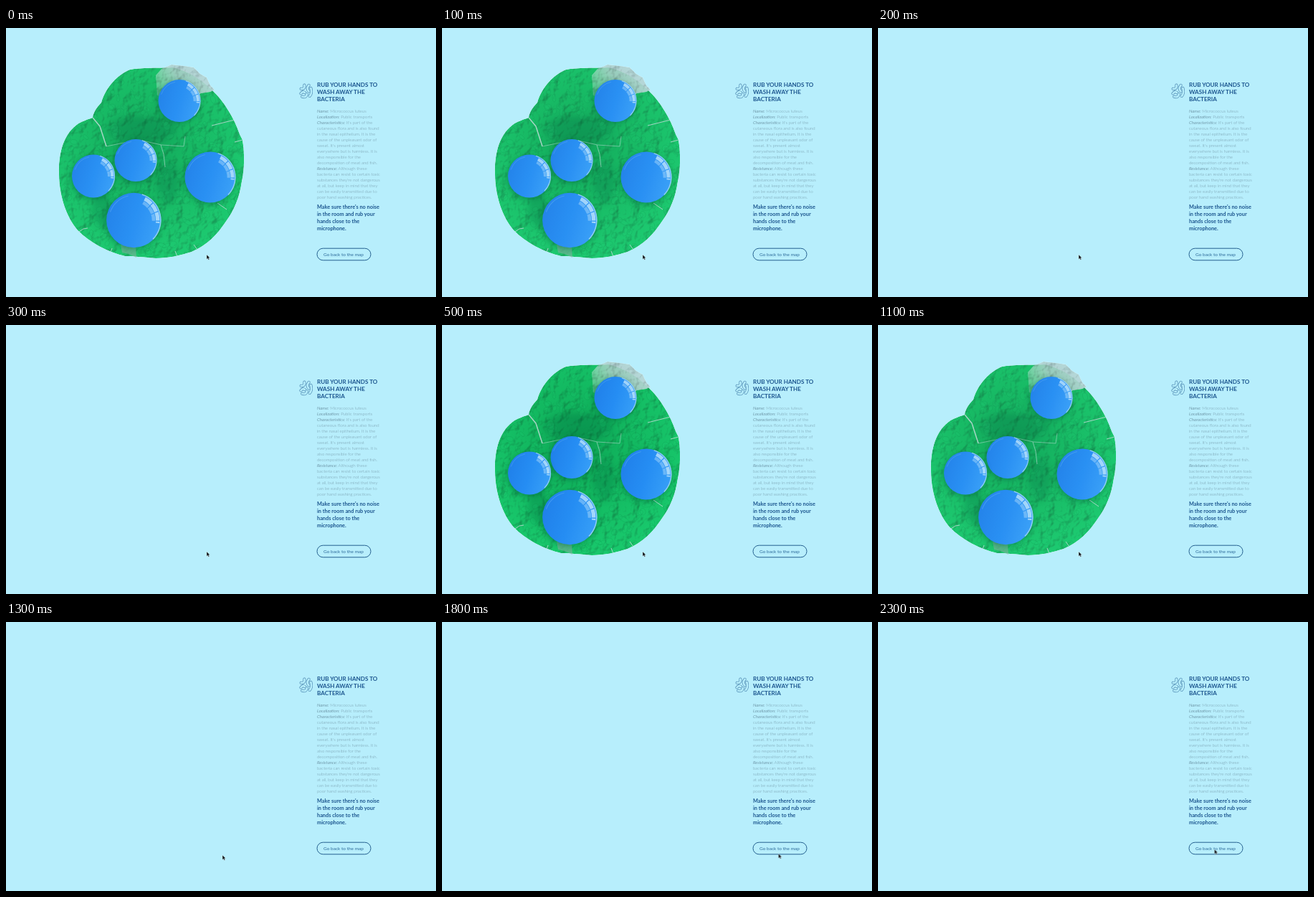
Animation of 600x375 px, one loop 2.4 s. Source, as an HTML page:

```html
<!DOCTYPE html>
<html lang="en">
<head>
<meta charset="utf-8">
<title>Rub your hands</title>
<style>
  html, body { margin: 0; width: 100%; height: 100%; overflow: hidden; background: #b7eefc; }
  svg { display: block; width: 600px; height: 375px; font-family: Lato, "Open Sans", sans-serif; }
  .head { font-size: 8.1px; font-weight: 700; fill: #1c568f; }
  .body { font-size: 6.1px; font-weight: 300; fill: #7397a7; }
  .body .label { font-style: italic; font-weight: 400; fill: #7199aa; }
  .note { font-size: 7.35px; font-weight: 700; fill: #1c568f; }
  .button text { font-size: 6.5px; fill: #2c6a99; }
  .button rect { fill: none; stroke: #24608f; }

  #colony { animation: blink 2400ms step-end infinite; }
  @keyframes blink {
    0% { opacity: .97; }
    8.33% { opacity: 0; }
    16.66% { opacity: 1; }
    33.33% { opacity: .98; }
    45.83% { opacity: .97; }
    50%, 100% { opacity: 0; }
  }

  #cursor { animation: travel 2400ms step-end infinite; }
  @keyframes travel {
    0% { transform: translate(280px, 316px); }
    54.16% { transform: translate(302px, 325px); }
    58.33% { transform: translate(352px, 335px); }
    62.5% { transform: translate(412px, 336px); }
    66.66% { transform: translate(450px, 332px); }
    70.83% { transform: translate(466px, 326px); }
    75% { transform: translate(469.5px, 323px); }
    79.16% { transform: translate(469.5px, 321px); }
    83.33% { transform: translate(469.5px, 318px); }
    87.5%, 100% { transform: translate(469.5px, 317px); }
  }
</style>
</head>
<body>
<svg viewBox="0 0 600 375">
  <defs>
    <radialGradient id="green" gradientUnits="userSpaceOnUse" cx="192" cy="165" r="155">
      <stop offset="0" stop-color="#0da555"/>
      <stop offset=".45" stop-color="#12b860"/>
      <stop offset="1" stop-color="#18c86c"/>
    </radialGradient>
    <linearGradient id="blue" x1="0" y1=".35" x2="1" y2=".65">
      <stop offset="0" stop-color="#2080ea"/>
      <stop offset=".5" stop-color="#258df3"/>
      <stop offset="1" stop-color="#379ff7"/>
    </linearGradient>
    <linearGradient id="grey" x1="0" y1=".6" x2="1" y2=".3">
      <stop offset="0" stop-color="#9fc9c0" stop-opacity=".3"/>
      <stop offset=".4" stop-color="#a0c4c0" stop-opacity=".85"/>
      <stop offset="1" stop-color="#b4d6d6" stop-opacity=".95"/>
    </linearGradient>
    <filter id="rough" color-interpolation-filters="sRGB">
      <feTurbulence type="fractalNoise" baseFrequency=".07" numOctaves="3" seed="7"/>
      <feDiffuseLighting surfaceScale="1.5" diffuseConstant="1.2" lighting-color="#fff" result="light">
        <feDistantLight azimuth="215" elevation="56"/>
      </feDiffuseLighting>
      <feBlend in="SourceGraphic" in2="light" mode="multiply" result="lit"/>
      <feComposite in="lit" in2="SourceGraphic" operator="in"/>
    </filter>
    <filter id="soft" x="-30%" y="-30%" width="160%" height="160%">
      <feGaussianBlur stdDeviation="4"/>
    </filter>
    <path id="disc" d="M121 125C122 117 127 110 133 104C138 86 152 67 173 58C188 55 213 56 233 55
      C258 61 275 74 288 87C305 103 319 127 326 148L330 156C333 174 333 197 329 214
      C326 236 318 255 306 271C295 287 281 303 259 312C244 317 226 321 209 321
      C193 320 180 318 166 318C141 312 117 299 100 282C83 262 74 231 74 204
      C73 178 79 153 94 139C102 131 112 128 121 125Z"/>
    <clipPath id="inside"><use href="#disc"/></clipPath>
  </defs>

  <g id="colony">
    <use href="#disc" fill="url(#green)" filter="url(#rough)"/>
    <g clip-path="url(#inside)">
      <g fill="#04693c" opacity=".28" filter="url(#soft)">
        <ellipse cx="190" cy="142" rx="48" ry="20"/>
        <ellipse cx="226" cy="215" rx="16" ry="30"/>
        <ellipse cx="134" cy="254" rx="14" ry="24"/>
      </g>
      <g id="bumps" fill="#1dcc72" fill-opacity=".1" stroke="#057a40" stroke-opacity=".2" stroke-width=".7"/>
      <g fill="none" stroke="#a5d5c3" stroke-linejoin="round">
        <path d="M121 125L131 137 140 165" stroke-width="1.5"/>
        <path d="M140 165L174 158 190 157 217 163 248 165 250 151" stroke-width=".8" opacity=".75"/>
        <path d="M216 163L220 176 222 194" stroke-width=".9" opacity=".8"/>
        <path d="M319 128L303 132 287 136M330 156L319 159M96 288L108 280 114 279M308 253L295 244M240 321L236 311M145 315L148 307M267 309L262 302" stroke-width="1"/>
      </g>
    </g>
    <path d="M209 66L217 57 231 51 249 53 262 55 271 64 280 69 285 80 291 86 285 89 272 91 264 96 235 100 211 94Z"
      fill="url(#grey)" filter="url(#rough)"/>
    <path d="M160 302L181 304 182 320 171 315 162 313Z" fill="#86aea2" opacity=".55"/>
    <g id="domes"/>
  </g>

  <g id="icon" fill="none" stroke-linecap="round"/>
  <g id="copy"></g>

  <g class="button">
    <rect x="434" y="307.2" width="75" height="16.6" rx="8.3"/>
    <text x="443" y="318">Go back to the map</text>
  </g>

  <path id="cursor" d="M0 0V6.4L1.5 5.1 2.5 7.3 3.7 6.8 2.7 4.6H4.6Z" fill="#0c1115" stroke="#e7f8fd" stroke-width=".4"/>
</svg>
<script>
  const NS = "http://www.w3.org/2000/svg";
  const byId = id => document.getElementById(id);

  function add(parent, tag, attrs, text = "") {
    const el = document.createElementNS(NS, tag);
    for (const key in attrs) el.setAttribute(key, attrs[key]);
    el.textContent = text;
    parent.append(el);
    return el;
  }

  let seed = 41;
  const random = () => (seed = seed * 16807 % 2147483647) / 2147483647;

  // Scale-like bumps spread over the disc
  for (let i = 0; i < 230; i++) {
    const angle = random() * Math.PI * 2;
    const dist = Math.sqrt(random()) * 132;
    const x = 203 + Math.cos(angle) * dist;
    const y = 189 + Math.sin(angle) * dist;
    add(byId("bumps"), "ellipse", {
      rx: 3 + random() * 4, ry: 2 + random() * 3,
      transform: `translate(${x} ${y}) rotate(${random() * 180})`
    });
  }

  function dome(x, y, r) {
    add(byId("domes"), "circle", {
      cx: x - 1, cy: y + 2, r, fill: "#035a35", opacity: .5, filter: "url(#soft)"
    });
    const g = add(byId("domes"), "g", { transform: `translate(${x} ${y}) scale(${r})` });
    add(g, "circle", { r: 1, fill: "url(#blue)" });

    const arc = (d, stroke, width, opacity, dash = "none") => add(g, "path", {
      d, stroke, opacity, fill: "none", "stroke-width": width, "stroke-dasharray": dash
    });
    arc("M.3-.94A.985.985 0 0 1 .7.69", "#b5e2fc", .04, .7);
    arc("M.4-.78A.877.877 0 0 1 .87.1", "#d3effd", .14, .7, ".3 .035");
    arc("M.34-.64A.725.725 0 0 1 .725.02", "#c2e6fd", .12, .4, ".25 .03");
    arc("M-.86-.3A.91.91 0 0 1-.2-.89", "#67b5fa", .03, .4);
  }
  dome(242, 101.5, 29.5);
  dome(181, 184.5, 29.5);
  dome(122, 206.5, 30);
  dome(285, 208, 35.5);
  dome(178.3, 268, 38.2);

  // Bean outlines: a dark stroke with a lighter one on top
  const beans = [
    "M411.6 84.8Q417.2 85.6 416.4 79.6",
    "M422.6 79.8Q418.6 84.6 422.6 88.4",
    "M411.4 91.4Q414 87.6 417.2 90.2",
    "M413.2 95.8Q419.4 97.4 419.8 92.2",
    "M425.4 83.8Q427.4 91.6 423.6 95"
  ];
  for (const [stroke, width] of [["#4884ae", 4], ["#b7eefc", 2.7]]) {
    for (const d of beans) add(byId("icon"), "path", { d, stroke, "stroke-width": width });
  }

  function lines(cls, y, step, rows) {
    rows.forEach((row, i) => {
      const text = add(byId("copy"), "text", { class: cls, x: 434, y: y + i * step });
      const [label, rest] = row.includes("|") ? row.split("|") : ["", row];
      if (label) add(text, "tspan", { class: "label" }, label);
      text.append(rest);
    });
  }
  lines("head", 81.6, 10.2, ["RUB YOUR HANDS TO", "WASH AWAY THE", "BACTERIA"]);
  lines("body", 117.8, 8.02, [
    "Name:| Micrococcus luteus",
    "Localization:| Public transports",
    "Characteristics:| It's part of the",
    "cutaneous flora and is also found",
    "in the nasal epithelium. It is the",
    "cause of the unpleasant odor of",
    "sweat. It's present almost",
    "everywhere but is harmless. It is",
    "also responsible for the",
    "decomposition of meat and fish.",
    "Resistance:| Although these",
    "bacteria can resist to certain toxic",
    "substances they're not dangerous",
    "at all, but keep in mind that they",
    "can be easily transmitted due to",
    "poor hand washing practices."
  ]);
  lines("note", 251.8, 10, [
    "Make sure there's no noise", "in the room and rub your", "hands close to the", "microphone."
  ]);
</script>
</body>
</html>
```
